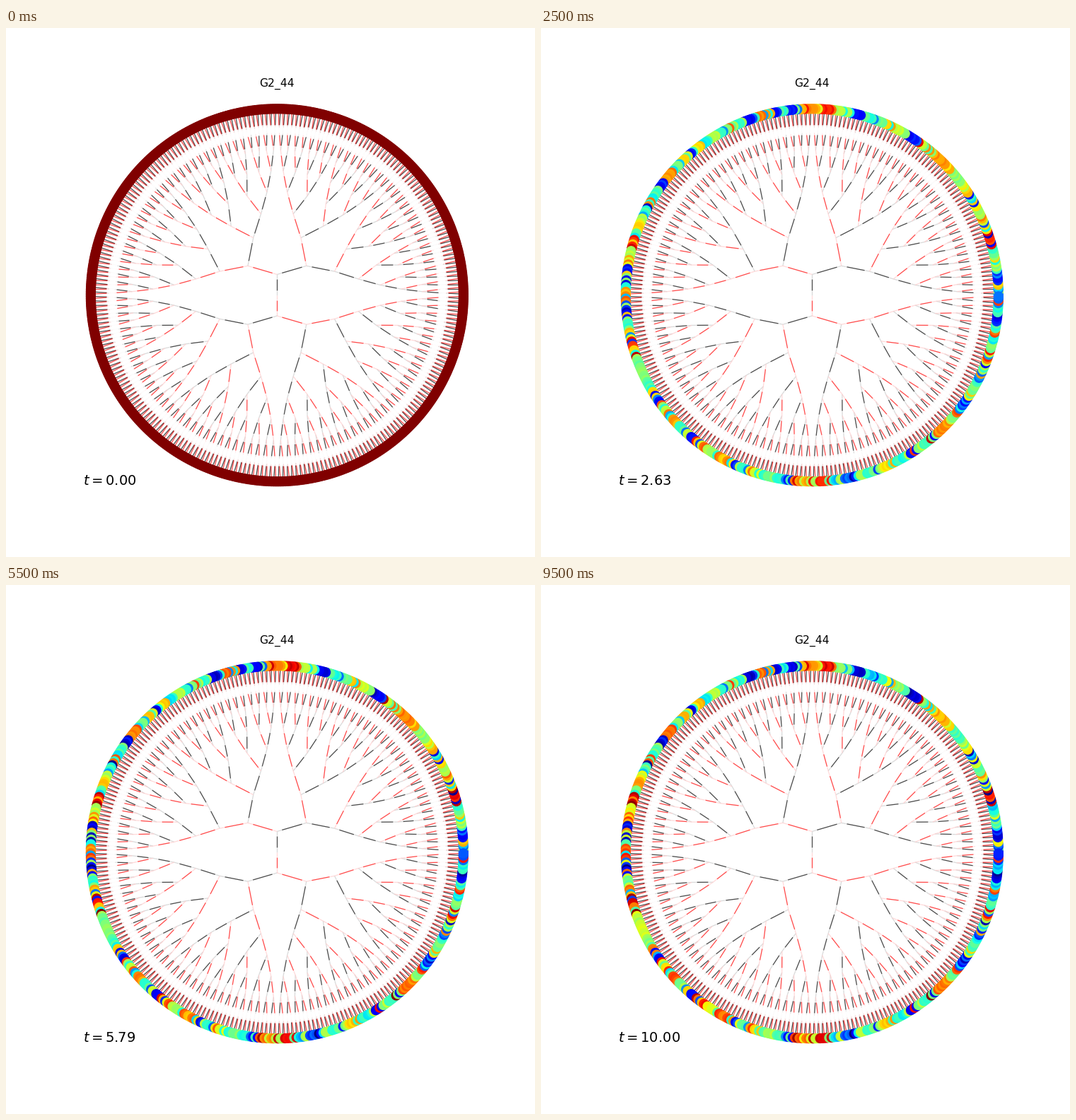
A matplotlib script for the animation above (10 s loop, 748 px wide and 748 px high).

```python
import numpy as np
import matplotlib.pyplot as plt
from matplotlib.animation import FuncAnimation
from matplotlib.collections import LineCollection

plt.rcParams["font.family"] = "DejaVu Sans"

DEPTH = 9
LEAVES = 2 ** DEPTH
FRAMES, INTERVAL = 20, 500
T_END = 10.0
NODE_SIZE = 100

rng = np.random.default_rng(44)
theta = 2 * np.pi * (np.arange(LEAVES) + 0.5) / LEAVES


def polar(depth):
    """Positions of all nodes at one depth, counter-clockwise from the right."""
    angle = 2 * np.pi * (np.arange(2 ** depth) + 0.5) / 2 ** depth
    return depth / DEPTH * np.column_stack([np.cos(angle), np.sin(angle)])


def paint(level, value, half_width, *centres):
    """Set the leaves around the given angles (degrees) to one value."""
    for centre in centres:
        level[abs(np.degrees(theta) - centre) < half_width] = value


def random_runs(values, weights, length):
    runs = rng.choice(values, LEAVES // length, p=weights)
    return np.repeat(runs, length)


def early_levels():
    level = random_runs([0.5, 0.75], [0.25, 0.75], 4)
    paint(level, 0.5, 3, 54, 75, 120, 168, 190, 240, 353)
    paint(level, 0.25, 1.2, 36, 145, 163, 211, 253, 302)
    paint(level, 1.0, 1.2, 12, 19, 92, 178, 262, 342)
    return level


def settled_levels():
    level = random_runs([0.4, 0.5, 0.58, 0.7], [0.3, 0.25, 0.25, 0.2], 4)
    paint(level, 0.1, 1.7, 6, 58, 76, 97, 102, 110, 144, 172, 186, 214, 231,
          245, 263, 303, 325, 353)
    paint(level, 0.78, 2.5, 47, 92, 105, 140, 181, 222, 242, 267, 314)
    paint(level, 0.92, 2.2, 18, 86, 164, 195, 274, 341)
    paint(level, 0.22, 2, 1, 282, 335, 359)
    stray = rng.random(LEAVES) < 0.22
    level = np.where(stray, rng.random(LEAVES), level)
    return np.clip(level + rng.normal(0, 0.03, LEAVES), 0, 1)


early, settled = early_levels(), settled_levels()


def levels(t):
    if t == 0:
        return np.ones(LEAVES)
    mix = np.interp(t, [1.06, 2.63], [0, 1])
    spread = 1 - 0.1 * np.exp(2.63 - t)
    late = 0.5 + (settled - 0.5) * spread
    drift = np.interp(t, [7.9, T_END], [0, 0.36])
    late = late - drift * late * (1 - late) * np.cos(theta - np.pi / 6)
    return np.clip((1 - mix) * early + mix * late, 0, 1)


fig, ax = plt.subplots(figsize=(8, 8), dpi=93.5, facecolor="white")
ax.set_xlim(-1.1, 1.1)
ax.set_ylim(-1.093, 1.093)
ax.axis("off")
ax.set_title("G2_44", fontsize=12, pad=5.4)

# Each node branches into a black clockwise edge and a red counter-clockwise one
segments, colors = [], []
for depth in range(1, DEPTH + 1):
    parents = np.repeat(polar(depth - 1), 2, axis=0)
    segments.extend(np.stack([parents, polar(depth)], axis=1))
    colors.extend(["black", "red"] * 2 ** (depth - 1))
ax.add_collection(LineCollection(segments, colors=colors, linewidths=1,
                                 alpha=0.7, zorder=1))

# Translucent white nodes fade the edge ends
inner = np.vstack([polar(depth) for depth in range(DEPTH)])
ax.scatter(*inner.T, s=NODE_SIZE, color="white", alpha=0.8, linewidths=1, zorder=2)

cmap = plt.get_cmap("jet")
rim = ax.scatter(*polar(DEPTH).T, s=NODE_SIZE, color="darkred",
                 linewidths=1, zorder=3, clip_on=False)
clock = ax.text(-1.04, -1.02, "", fontsize=15)


def update(frame):
    t = T_END * frame / (FRAMES - 1)
    shades = cmap(levels(t))
    rim.set_facecolor(shades)
    rim.set_edgecolor(shades)
    clock.set_text(f"$t={t:.2f}$")
    return rim, clock


anim = FuncAnimation(fig, update, frames=FRAMES, interval=INTERVAL,
                     repeat=True, repeat_delay=0)
plt.show()
```
